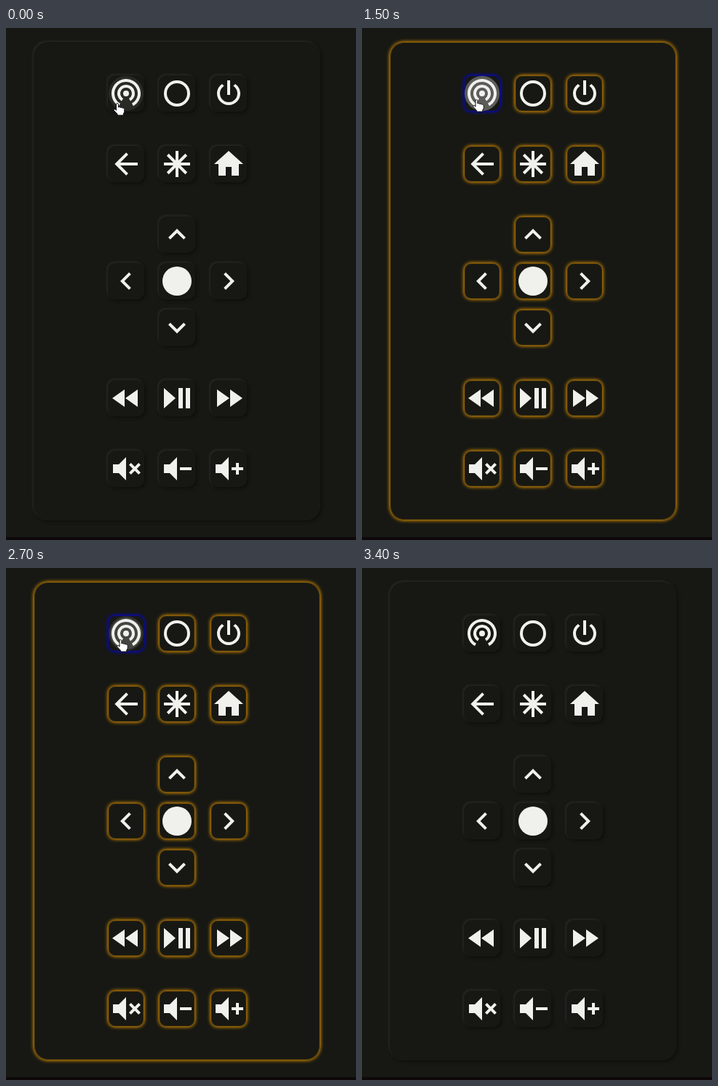
An HTML page with a canvas that plays this animation: 481 px wide and 704 px high, repeating every 3500 ms.

```html
<!DOCTYPE html>
<html lang="en">
<head>
<meta charset="utf-8">
<title>Remote control</title>
<style>
  html, body { margin: 0; width: 100%; height: 100%; overflow: hidden; background: #171813; }
  canvas { display: block; }
</style>
</head>
<body>
<canvas id="stage" width="481" height="704"></canvas>
<script>
const ctx = document.getElementById('stage').getContext('2d');
const LOOP = 3500, STEP = 100;
const BG = '#171813', INK = '#f0f1ec';
const AMBER = '255,165,0', BLUE = '0,0,255';
const COLS = [165, 235, 306];

// Icon outlines on a 24-unit grid, drawn at double size.
const SPEAKER = 'M3 9H7L12 4V20L7 15H3Z';
const ICONS = {
  power: 'M16.56 5.44L15.11 6.89C16.84 7.94 18 9.83 18 12A6 6 0 0 1 6 12C6 9.83 7.16 7.94 8.88 6.88L7.44 5.44C5.36 6.88 4 9.28 4 12A8 8 0 0 0 20 12C20 9.28 18.64 6.88 16.56 5.44M13 3H11V13H13Z',
  back: 'M20 11V13H8L13.5 18.5L12.08 19.92L4.16 12L12.08 4.08L13.5 5.5L8 11Z',
  home: 'M10 20V14H14V20H19V12H22L12 3L2 12H5V20Z',
  up: 'M7.41 15.41L12 10.83L16.59 15.41L18 14L12 8L6 14Z',
  left: 'M15.41 16.58L10.83 12L15.41 7.41L14 6L8 12L14 18Z',
  right: 'M8.59 16.58L13.17 12L8.59 7.41L10 6L16 12L10 18Z',
  down: 'M7.41 8.58L12 13.17L16.59 8.58L18 10L12 16L6 10Z',
  rewind: 'M11.5 12L20 18V6ZM11 18V6L2.5 12Z',
  play: 'M3 5V19L11 12ZM13 19H16V5H13ZM18 5V19H21V5Z',
  forward: 'M13 6V18L21.5 12ZM4 18L12.5 12L4 6Z',
  mute: SPEAKER + 'M16.59 12L14 9.41L15.41 8L18 10.59L20.59 8L22 9.41L19.41 12L22 14.59L20.59 16L18 13.41L15.41 16L14 14.59Z',
  minus: SPEAKER + 'M14 11H22V13H14Z',
  plus: SPEAKER + 'M14 11H17V8H19V11H22V13H19V16H17V13H14Z'
};
for (const name in ICONS) ICONS[name] = new Path2D(ICONS[name]);

const ROWS = [
  [90, 'cast', 'ring', 'power'],
  [187, 'back', 'star', 'home'],
  [284, '', 'up', ''],
  [348, 'left', 'dot', 'right'],
  [412, '', 'down', ''],
  [509, 'rewind', 'play', 'forward'],
  [606, 'mute', 'minus', 'plus']
];

const HAND = new Path2D('M4 1.8C4 .2 6.9 .2 6.9 1.8V6C7.6 5.3 9.4 5.5 9.7 6.5C10.5 5.9 12.1 6.2 12.4 7.2C13.5 6.7 15.2 7.2 15.2 8.6V12.4L13.8 15V17H5.6V15.4L1 10.6C.1 9.2 1.6 8 2.8 9L4 10.2Z');

const SHAPES = {
  cast() {
    disc(0, 0, 4);
    for (const r of [10, 18]) arc(r, Math.PI * 2 / 3, Math.PI * 7 / 3);
  },
  ring() { arc(16, 0, Math.PI * 2); },
  dot() { disc(0, 0, 20); },
  star() {
    for (let i = 0; i < 4; i++) {
      ctx.fillRect(-18, -2, 36, 4);
      ctx.rotate(Math.PI / 4);
    }
  }
};

function disc(x, y, r) {
  ctx.beginPath();
  ctx.arc(x, y, r, 0, Math.PI * 2);
  ctx.fill();
}

function arc(r, from, to) {
  ctx.beginPath();
  ctx.arc(0, 0, r, from, to);
  ctx.stroke();
}

function box(x, y, w, h, r) {
  ctx.beginPath();
  ctx.roundRect(x, y, w, h, r);
}

function shadow(color, blur, offset) {
  ctx.save();
  ctx.shadowColor = color;
  ctx.shadowBlur = blur;
  ctx.shadowOffsetX = ctx.shadowOffsetY = offset;
  ctx.fill();
  ctx.restore();
}

function plate(x, y, w, h, r, glow) {
  ctx.fillStyle = BG;
  box(x, y, w, h, r);
  if (!glow) {
    shadow('#0e0f0b', 4, 2);
    shadow('#282924', 3, -1.5);
    return;
  }
  shadow(`rgb(${glow})`, 5, 0);
  ctx.lineWidth = 1;
  ctx.strokeStyle = `rgba(${glow},.5)`;
  box(x + .5, y + .5, w - 1, h - 1, r - .5);
  ctx.stroke();
  ctx.strokeStyle = `rgba(${glow},.1)`;
  box(x + 1.5, y + 1.5, w - 3, h - 3, r - 1.5);
  ctx.stroke();
}

function icon(name, x, y) {
  ctx.save();
  ctx.translate(x, y);
  ctx.fillStyle = ctx.strokeStyle = INK;
  ctx.lineWidth = 4;
  if (SHAPES[name]) {
    SHAPES[name]();
  } else {
    ctx.scale(2, 2);
    ctx.translate(-12, -12);
    ctx.fill(ICONS[name]);
  }
  ctx.restore();
}

// Press feedback: expands in one step, then fades out.
function ripple(age, fade) {
  if (age < 0 || age >= STEP + fade) return;
  const alpha = age < STEP ? .13 : .24 * (1 - (age - STEP) / fade);
  ctx.fillStyle = `rgba(255,255,255,${alpha})`;
  disc(COLS[0], 90, age < STEP ? 22 : 24);
}

function cursor(x, y) {
  ctx.save();
  ctx.translate(x, y);
  ctx.lineWidth = 1;
  ctx.lineJoin = 'round';
  ctx.strokeStyle = '#111';
  ctx.fillStyle = '#fff';
  ctx.fill(HAND);
  ctx.stroke(HAND);
  ctx.restore();
}

function draw(t) {
  const lit = t >= 1500 && t < 2800;
  const hover = t < 3400;
  ctx.fillStyle = BG;
  ctx.fillRect(0, 0, 481, 704);
  ctx.fillStyle = '#0e080b';
  ctx.fillRect(0, 700, 481, 4);
  plate(38, 19, 394, 658, 20, lit && AMBER);

  for (const [y, ...names] of ROWS) {
    names.forEach((name, i) => {
      if (!name) return;
      const x = COLS[i];
      const glow = name === 'cast' ? BLUE : AMBER;
      plate(x - 25, y - 25, 50, 50, 10, lit && glow);
      if (name === 'cast' && hover) {
        ctx.fillStyle = 'rgba(255,255,255,.08)';
        disc(x, y, 24);
        ripple(t - 1400, 200);
        ripple(t - 2700, 400);
      }
      icon(name, x, y);
    });
  }
  if (hover) t < 800 ? cursor(147.5, 103) : cursor(152, 98);
}

function tick(now) {
  draw(Math.floor((now - start) % LOOP / STEP) * STEP);
  requestAnimationFrame(tick);
}

const start = performance.now();
draw(0);
requestAnimationFrame(now => tick(Math.max(now, start)));
</script>
</body>
</html>
```
